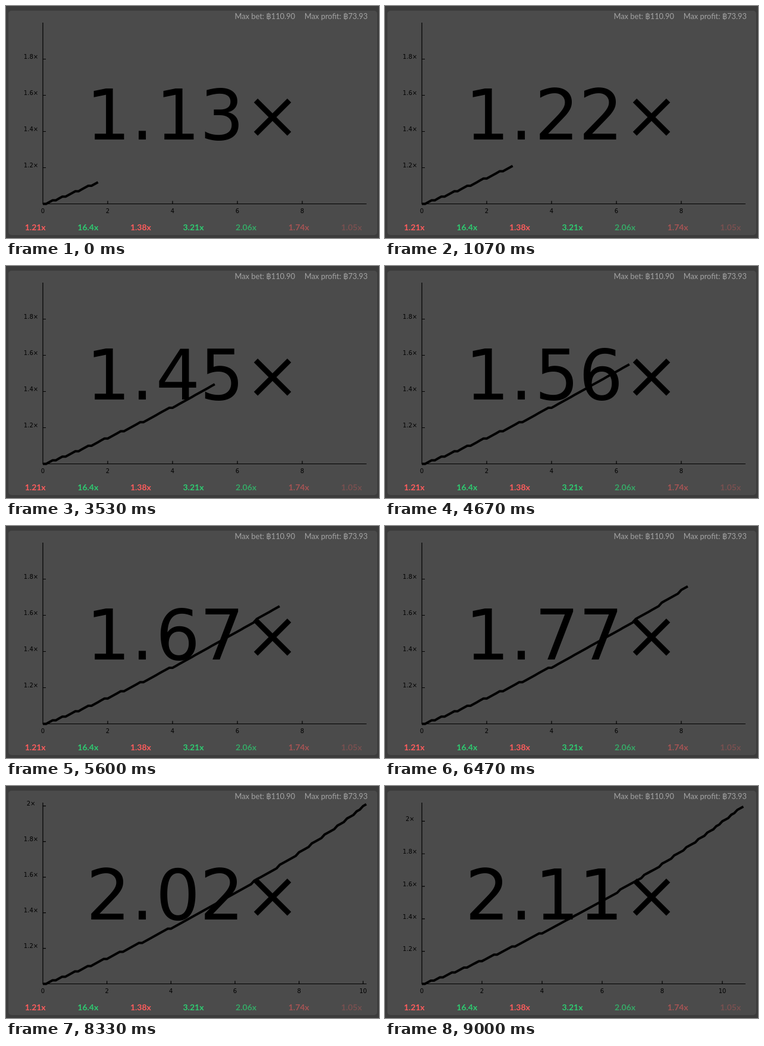
These frames come from a looping animation (627 px wide and 391 px high, 9070 ms). An HTML page:

```html
<!DOCTYPE html>
<html lang="en">
<head>
<meta charset="utf-8">
<title>Multiplier chart</title>
<style>
  html, body { margin: 0; width: 100%; height: 100%; overflow: hidden; background: #3c3c3c; }
  svg { display: block; width: 627px; height: 391px; }
  .info { font: 12.85px Lato, sans-serif; fill: #a3a3a3; text-anchor: end; }
  .past { font: bold 14px Lato, sans-serif; text-anchor: middle; }
  .low { fill: #ff5c5c; }
  .high { fill: #2ecc71; }
  .label { font: 10px "DejaVu Sans", sans-serif; text-anchor: middle; }
  .big { font: 117px "DejaVu Sans", sans-serif; text-anchor: middle; }
  .times { font-size: 111px; }
  .axis, #ticks { fill: none; stroke: #000; stroke-width: 1.2; }
  #curve { fill: none; stroke: #000; stroke-width: 4; }
</style>
</head>
<body>
<svg viewBox="0 0 627 391">
  <rect x="4" y="8" width="620" height="378" rx="5" fill="#4b4b4b"/>
  <text class="info" x="486" y="22">Max bet: ฿110.90</text>
  <text class="info" x="608" y="22">Max profit: ฿73.93</text>
  <g id="history"></g>
  <path class="axis" d="M62 28V333.5H606"/>
  <path id="ticks"/>
  <g id="labels"></g>
  <text id="value" class="big" x="172 229 289 363" y="224.5"></text>
  <text class="big times" x="448" y="221.5">×</text>
  <path id="curve"/>
</svg>
<script>
const LOOP = 9070, FRAME = 1000 / 15, START = 1.7915;
const LEFT = 62, BASE = 333.5, WIDTH = 545, HEIGHT = 305;
const $ = id => document.getElementById(id);
const growth = s => 2 ** (s / 10);
const label = (x, y, text) => `<text class="label" x="${x}" y="${y}">${text}</text>`;

const past = [[1.21, 1], ['16.4', 1], [1.38, 1], [3.21, 1], ['2.06', .72], [1.74, .5], [1.05, .25]];
$('history').innerHTML = past.map(([v, alpha], i) =>
  `<text class="past ${v < 2 ? 'low' : 'high'}" x="${49.2 + 88.6 * i}" y="378" opacity="${alpha}">${v}x</text>`
).join('');

function draw(sec) {
  const value = growth(sec);
  const spanX = Math.max(10, sec), top = Math.max(2, value);
  const px = s => LEFT + s / spanX * WIDTH;
  const py = v => BASE - (v - 1) / (top - 1) * HEIGHT;

  // The curve is sampled every 0.1 s and rounded down to hundredths.
  const points = [];
  for (let i = 0; i <= Math.floor(sec * 10); i++) {
    const v = Math.floor(growth(i / 10) * 100 + 1e-6) / 100;
    points.push(px(i / 10).toFixed(2) + ' ' + py(v).toFixed(2));
  }
  $('curve').setAttribute('d', 'M' + points.join('L'));

  let ticks = '', labels = '';
  for (let s = 0; s < spanX; s += 2) {
    if (s) ticks += `M${px(s)} ${BASE}v-5`;
    labels += label(px(s), 349, s);
  }
  for (let k = 6; k / 5 < top; k++) {
    const y = py(k / 5);
    ticks += `M${LEFT} ${y}h5`;
    labels += label(42, y - 0.3, k / 5 + '×');
  }
  $('ticks').setAttribute('d', ticks);
  $('labels').innerHTML = labels;
  $('value').textContent = value.toFixed(2);
}

let last = -1;
function tick() {
  const ms = performance.now() % LOOP;
  const step = Math.floor((Math.floor(ms / 10) * 10 + 3.4) / FRAME);
  if (step !== last) {
    last = step;
    draw(START + step * FRAME / 1000);
  }
  requestAnimationFrame(tick);
}
tick();
</script>
</body>
</html>
```
